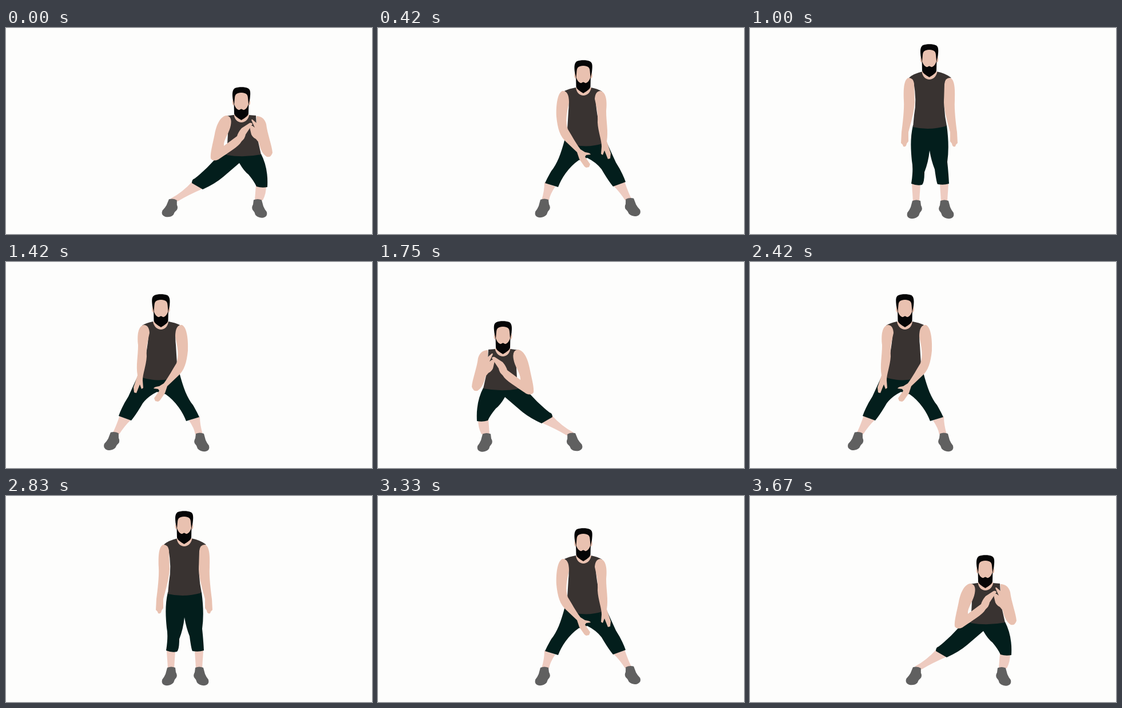
An HTML page that plays this animation: 640 by 360 pixels, repeating every 3.76 s.

```html
<!DOCTYPE html>
<html lang="en">
<head>
<meta charset="utf-8">
<title>Side lunges</title>
<style>
  html, body { margin: 0; width: 100%; height: 100%; overflow: hidden; background: #fdfdfc; }
  svg { display: block; width: 100vw; height: 100vh; }
  .skin { fill: #e9c1b0; }
  .calf { fill: #eecbc0; }
  .shorts { fill: #031e1c; }
  .shirt { fill: #393331; }
  .shoe { fill: #606060; }
  .hair { fill: #050506; }
</style>
</head>
<body>
<svg viewBox="0 0 640 360">
  <defs>
    <path id="shoe" class="shoe" d="M-6 1Q1 -2 8 1L9 9Q12 14 10 18Q6 22 5 27Q0 33 -9 32Q-17 30 -15 22Q-11 17 -9 12Z"/>
    <g id="head">
      <ellipse class="skin" cx="-13.5" cy="27" rx="2.3" ry="5"/>
      <ellipse class="skin" cx="13.5" cy="27" rx="2.3" ry="5"/>
      <path class="hair" d="M-13 30L-15 21C-16 12 -16 5 -11 2C-5 -.5 6 -.5 11 2C16 4 16.5 9 15 21L13 30Z"/>
      <path class="skin" d="M-12.5 30L-11.5 19Q-11 12 -6 11Q0 9 6 11Q11 12 11.5 19L12.5 30Q12 42 0 42Q-12 42 -12.5 30Z"/>
      <path class="hair" d="M-13 27C-12 36 -6 41 -3 40Q0 37 3 40C6 41 12 36 13 27L12.5 47Q11 52 0 58Q-11 52 -12.5 47Z"/>
    </g>
  </defs>
  <g id="figure"></g>
</svg>
<script>
const path = (cls, d, attrs = '') => `<path class="${cls}" d="${d}" ${attrs}/>`;
const place = (id, transform) => `<use href="#${id}" transform="${transform}"/>`;

const drawPose = p =>
  p.calves.map(d => path('calf', d)).join('') +
  p.shoes.map(t => place('shoe', t)).join('') +
  path('shorts', p.shorts) +
  path('shirt', p.shirt) +
  path('skin', 'M-13 48C-11 66.5 11 66.5 14 48Z', `transform="translate(${p.head})"`) +
  p.arms.map(a => path('skin', a.d || a, a.attrs)).join('') +
  place('head', `translate(${p.head})`);

const standingArm = 'M275 85C268 88 266 100 267 125C268 140 265 165 263 180L262 199Q265 201 266 205Q271 207 272 200L275 196V180C279 165 285 145 286 128L285 96Q284 85 275 85Z';

const poses = {
  stand: drawPose({
    head: '311.5 26',
    calves: ['M281 270H296L294 301H283Z', 'M330 270H345L343 301H332Z'],
    shoes: ['translate(288 299)', 'translate(339 299) scale(-1 1)'],
    shorts: 'M283 168C278 190 279 210 281 230Q284 245 280 270Q290 274 299 272Q303 268 303 250Q310 232 312 212Q315 230 321 245Q324 268 326 271Q337 273 346 270Q345 250 343 232Q347 205 342 168Z',
    shirt: 'M300 74Q283 78 276 85L284 92Q290 125 285 150L283 171Q312 178 342 169Q335 135 339 110L342 88L350 85Q340 77 324 74Z',
    arms: [standingArm, { d: standingArm, attrs: 'transform="translate(623 0) scale(-1 1)"' }]
  }),
  half: drawPose({
    head: '359 56',
    calves: ['M291 270L310 277Q301 290 299 301H286Q291 285 291 270Z', 'M412 276L431 268Q437 286 443 298L432 301Q424 288 412 276Z'],
    shoes: ['translate(290 299)', 'translate(441 297.5) rotate(-6) scale(-1 1)'],
    shorts: 'M327 193C320 220 313 238 303 250Q296 262 292 271L315 278Q320 265 328 254Q338 240 351 231L366 227Q382 235 391 247Q402 266 411 277L433 269Q427 252 416 235L400 200Z',
    shirt: 'M346 104Q334 106 326 110Q336 120 333 145L331 178L346 205Q370 209 392 202L386 165Q380 135 381 120Q384 112 392 111Q384 106 372 104Z',
    arms: [
      'M323 110C314 112 311 135 312 155C314 175 318 190 330 200L348 217L352 229L361 242L364 244L369 243L371 238L362 225L364 222L372 221Q371 218 362 217L354 212C345 200 339 188 332 177C327 165 330 148 334 130Q334 110 323 110Z',
      'M389 110C399 112 401 128 399 145C399 165 403 180 400 198L407 219L406 228L402 229L396 214L393 222L390 220L391 207C391 195 385 182 384 165C385 148 382 138 379 124Q380 110 389 110Z'
    ]
  }),
  lunge: drawPose({
    head: '411.5 103',
    calves: ['M327 267L346 280Q318 292 300 303L288 298Q308 288 327 267Z', 'M437 275H455Q455 290 449 301H435Q436 288 437 275Z'],
    shoes: ['translate(291 299) rotate(7)', 'translate(441 299.5) scale(-1 1)'],
    shorts: 'M386 220L364 231Q348 249 330 263Q325 264 325 271L344 282Q366 272 380 260L408 236Q416 250 424 256Q434 268 438 277Q447 280 457 278Q459 245 446 220Z',
    shirt: 'M398 152L384 154Q392 170 388 185L386 222Q415 227 446 221L439 190L437 153L424 152Z',
    arms: [
      'M385 153C374 155 368 170 365 185C361 205 357 218 358 228Q362 234 371 230L396 213Q408 205 412 198Q418 193 419 186L431 168Q430 165 426 166L412 175Q406 182 404 189L381 206C380 195 391 183 393 170Q396 154 385 153Z',
      'M438 154Q451 154 455 168C457 185 465 205 466 218Q463 227 456 225Q446 219 442 200L437 194Q429 190 428 182L426 173Q428 170 431 171L435 174L430 163Q428 159 431 160L438 166Z'
    ]
  })
};

const LOOP = 3760;
const MIRROR = 'translate(630 0) scale(-1 1)';
// Each step: start time, pose, transform
const steps = [
  [0, 'lunge', ''],
  [80, 'half', ''],
  [580, 'stand', 'translate(2 2)'],
  [1080, 'half', MIRROR],
  [1500, 'lunge', MIRROR],
  [2000, 'half', MIRROR],
  [2500, 'stand', ''],
  [2920, 'half', ''],
  [3420, 'lunge', '']
];

const figure = document.getElementById('figure');
const startTime = performance.now();
let current;

function render(time) {
  const step = steps.findLast(([start]) => start <= time);
  if (step === current) return;
  current = step;
  figure.innerHTML = poses[step[1]];
  figure.setAttribute('transform', step[2]);
}

function tick() {
  render((performance.now() - startTime) % LOOP);
  requestAnimationFrame(tick);
}
tick();
</script>
</body>
</html>
```
